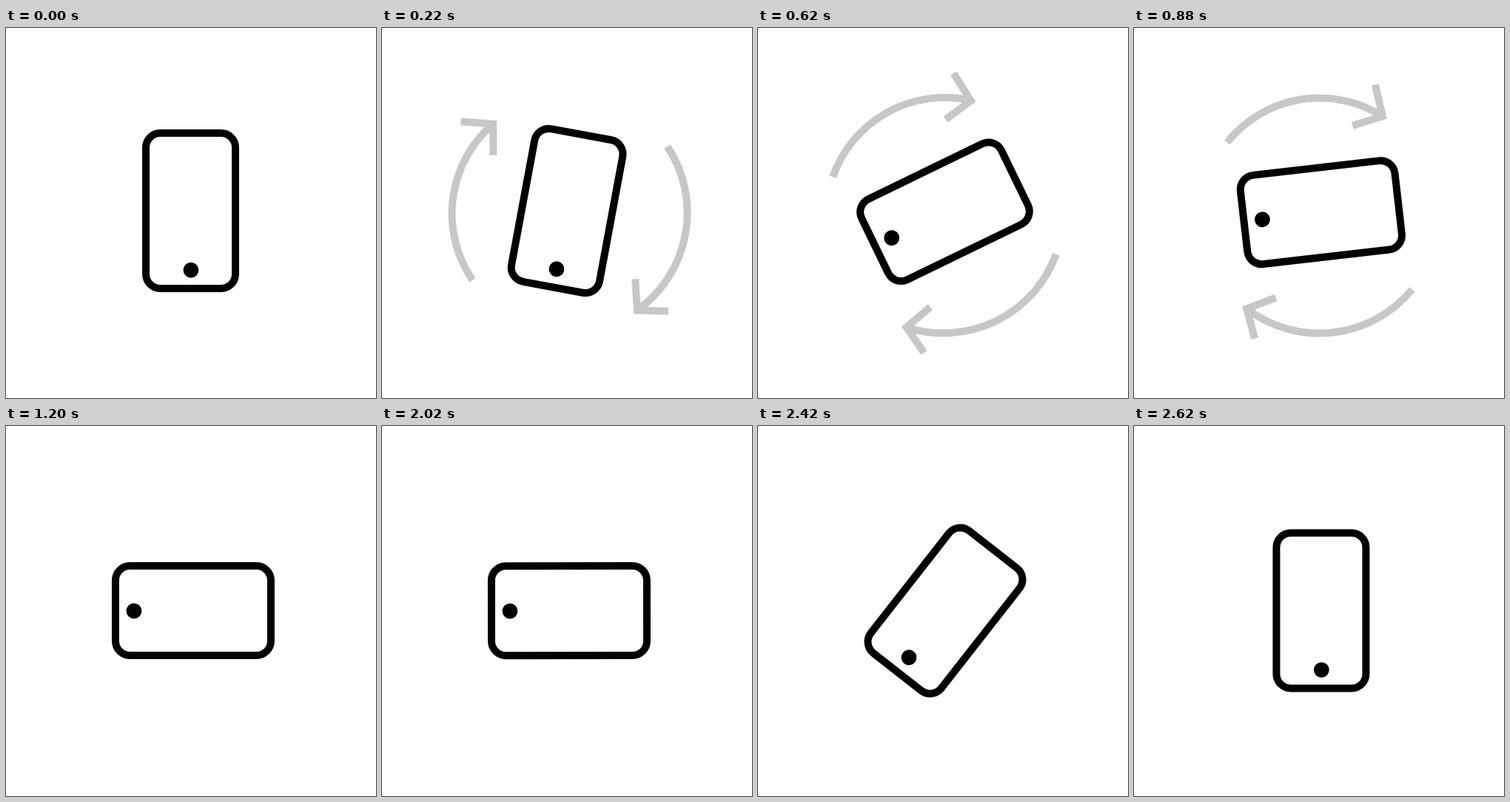
Animation of 500x500 px, one loop 3260 ms. Source, as an HTML page:

```html
<!DOCTYPE html>
<html lang="en">
<head>
<meta charset="utf-8">
<title>Rotate device</title>
<style>
  html, body { margin: 0; height: 100%; overflow: hidden; background: #fff; }
  svg { display: block; width: 100%; height: 100%; fill: none; stroke-width: 10; }
</style>
</head>
<body>
<svg viewBox="0 0 500 500">
  <g id="arrows" stroke="#c7c7c7" opacity="0">
    <path d="M-108.9 112.6A159.6 159.6 0 0 1-120.1-100.2M-163.5-95.2L-120.1-100.2L-112.1-58.5"/>
    <path d="M117-113.1A162 162 0 0 1 117.3 111.9M106.9 71L117.3 111.9L158.7 105.5"/>
  </g>
  <g id="phone" stroke="#000">
    <rect x="-60.5" y="-105" width="121" height="210" rx="19.5"/>
    <circle cx="0.4" cy="80" r="10.4" fill="#000" stroke="none"/>
  </g>
</svg>
<script>
  const LOOP = 3260, TURN_END = 1200, BACK_START = 2000, BACK_TIME = 620, FADE = 160;
  const arrows = document.getElementById('arrows');
  const phone = document.getElementById('phone');
  const clamp = v => Math.max(0, Math.min(1, v));

  // Bezier easing with control points (x1, 0) and (x2, 1)
  function ease(x, x1, x2) {
    x = clamp(x);
    if (x === 0 || x === 1) return x;
    const curve = (s, a, b) => 3 * a * s * (1 - s) ** 2 + 3 * b * s * s * (1 - s) + s ** 3;
    let low = 0, high = 1;
    for (let i = 0; i < 30; i++) {
      const mid = (low + high) / 2;
      if (curve(mid, x1, x2) < x) low = mid; else high = mid;
    }
    return curve(low, 0, 1);
  }

  function draw(t) {
    const turn = 90 * ease(t / TURN_END, 0.34, 0.374);
    if (t < BACK_START) {
      // The turn pivots on the stage centre, slightly off the phone's own
      phone.setAttribute('transform', `translate(250 250) rotate(${turn}) translate(-.45 -2.95)`);
    } else {
      const back = 90 * (1 - ease((t - BACK_START) / BACK_TIME, 0.7, 0.68));
      phone.setAttribute('transform', `translate(252.95 249.55) rotate(${back})`);
    }
    arrows.setAttribute('transform', `translate(250 250) rotate(${turn})`);
    arrows.setAttribute('opacity', clamp(Math.min(t, TURN_END - t) / FADE));
  }

  const start = performance.now();
  function tick() {
    draw((performance.now() - start) % LOOP);
    requestAnimationFrame(tick);
  }
  tick();
</script>
</body>
</html>
```
